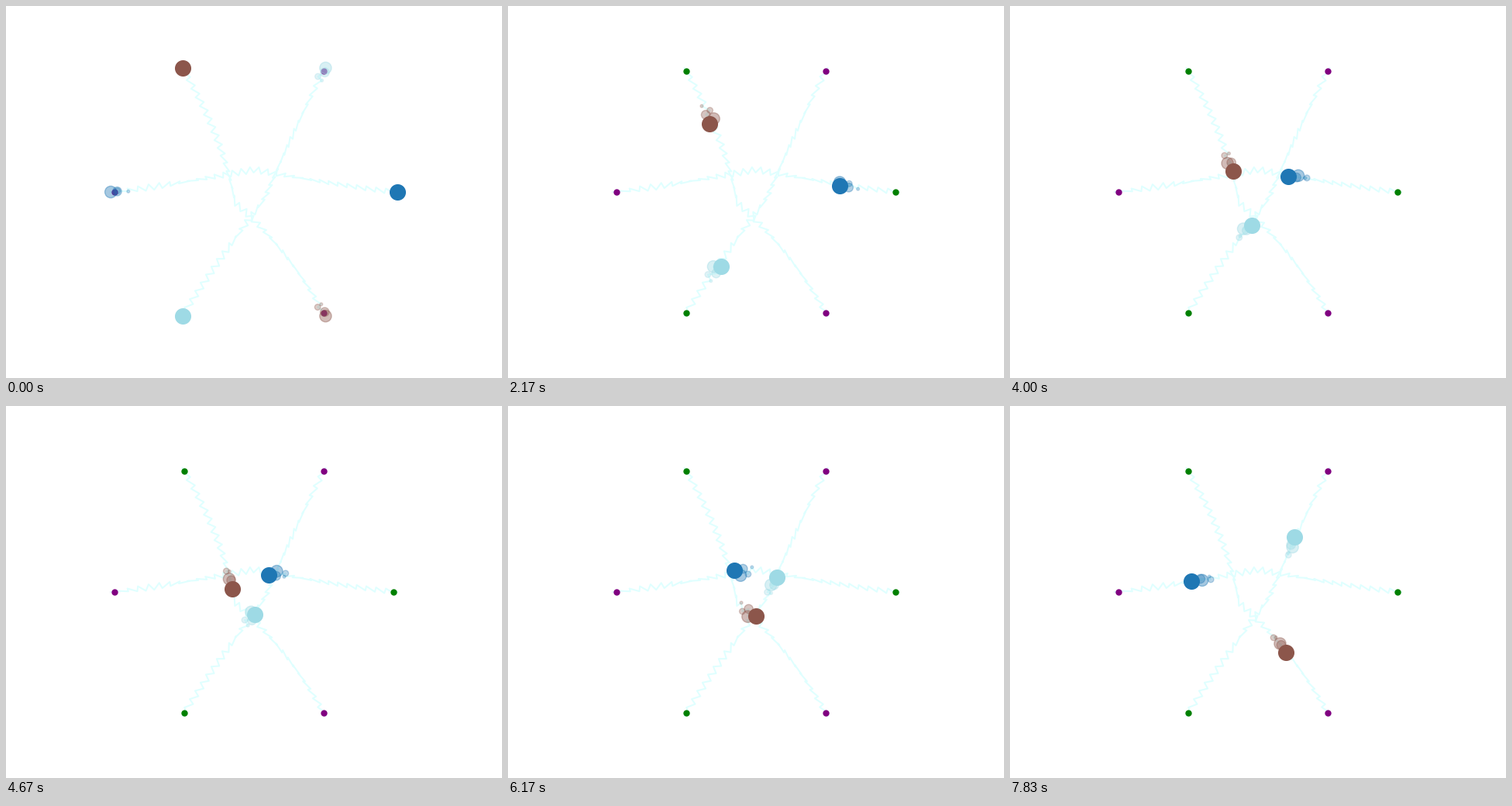
Write a matplotlib script that moves like this. It is 640x480 px and loops after 8 s.

```python
import numpy as np
import matplotlib.pyplot as plt
from matplotlib.animation import FuncAnimation
from matplotlib.colors import to_rgba

W, H, DPI = 640, 480, 100
LOOP_MS, TICK_MS = 8000, 20
RATE = 6  # hops per second
STEPS = 64  # hops from start to goal
DOT_R, REACH = 180, 184.8
ZIGZAG = 4
TRAIL = np.arange(4)

# colour, start angle, bend and its sharpness, zigzag direction at each quarter
AGENTS = [
    ("#1f77b4", 0, 29, 1.2, (120, 140, 262, 370, 560)),
    ("#8c564b", 240, 28, 2.3, (225, 250, 144, -15, 60)),
    ("#9edae5", 120, 16, 1.4, (300, 260, -40, 40, -75)),
]


def unit(degrees):
    a = np.radians(degrees)
    return np.stack([np.cos(a), np.sin(a)], axis=-1)


def ring(degrees):
    return (W / 2, H / 2) + DOT_R * unit(degrees)


def make_path(start, bend, sharpness, turns):
    """Cross the stage, swerving round the centre in alternating hops."""
    n = np.arange(STEPS + 1)
    p = n / STEPS
    along = REACH * (1 - 2 * p) - 5 * np.sin(2 * np.pi * p)
    across = bend * (1 - np.abs(along) / REACH) ** sharpness

    size = ZIGZAG * np.minimum(1, np.minimum(n, STEPS - n) / 2)
    size[1::2] *= -1
    turn = unit(np.interp(p, np.linspace(0, 1, len(turns)), turns))
    along = along + size * turn[:, 0]
    across = across + size * turn[:, 1]
    return ((W / 2, H / 2) + np.outer(along, unit(start))
            + np.outer(across, unit(start - 90)))


fig = plt.figure(figsize=(W / DPI, H / DPI), dpi=DPI, facecolor="white")
ax = fig.add_axes([0, 0, 1, 1])
ax.set_xlim(0, W)
ax.set_ylim(H, 0)
ax.axis("off")

ax.scatter(*ring([0, 120, 240]).T, s=25, color="green", zorder=2)
ax.scatter(*ring([60, 180, 300]).T, s=25, color="purple", zorder=2)

paths, trails, heads = [], [], []
for color, *shape in AGENTS:
    path = make_path(*shape)
    ax.plot(*path.T, color="lightcyan", lw=1.5, zorder=1)
    fade = 1 - TRAIL / len(TRAIL)
    shades = [to_rgba(color, 0.2 + 0.2 * f) for f in fade]
    paths.append(path)
    trails.append(ax.scatter(*path[TRAIL].T, s=120 * fade ** 2, c=shades, zorder=3))
    heads.append(ax.scatter(*path[:1].T, s=200, color=color, zorder=4))


def update(frame):
    # The small lead keeps hops on time despite the coarse tick
    n = int((frame * TICK_MS + 15) * RATE / 1000)
    for path, trail, head in zip(paths, trails, heads):
        trail.set_offsets(path[n - 1 - TRAIL])  # negative wraps to the path's end
        head.set_offsets(path[n:n + 1])
    return trails + heads


anim = FuncAnimation(fig, update, frames=LOOP_MS // TICK_MS, interval=TICK_MS,
                     repeat=True, repeat_delay=0)
plt.show()
```
